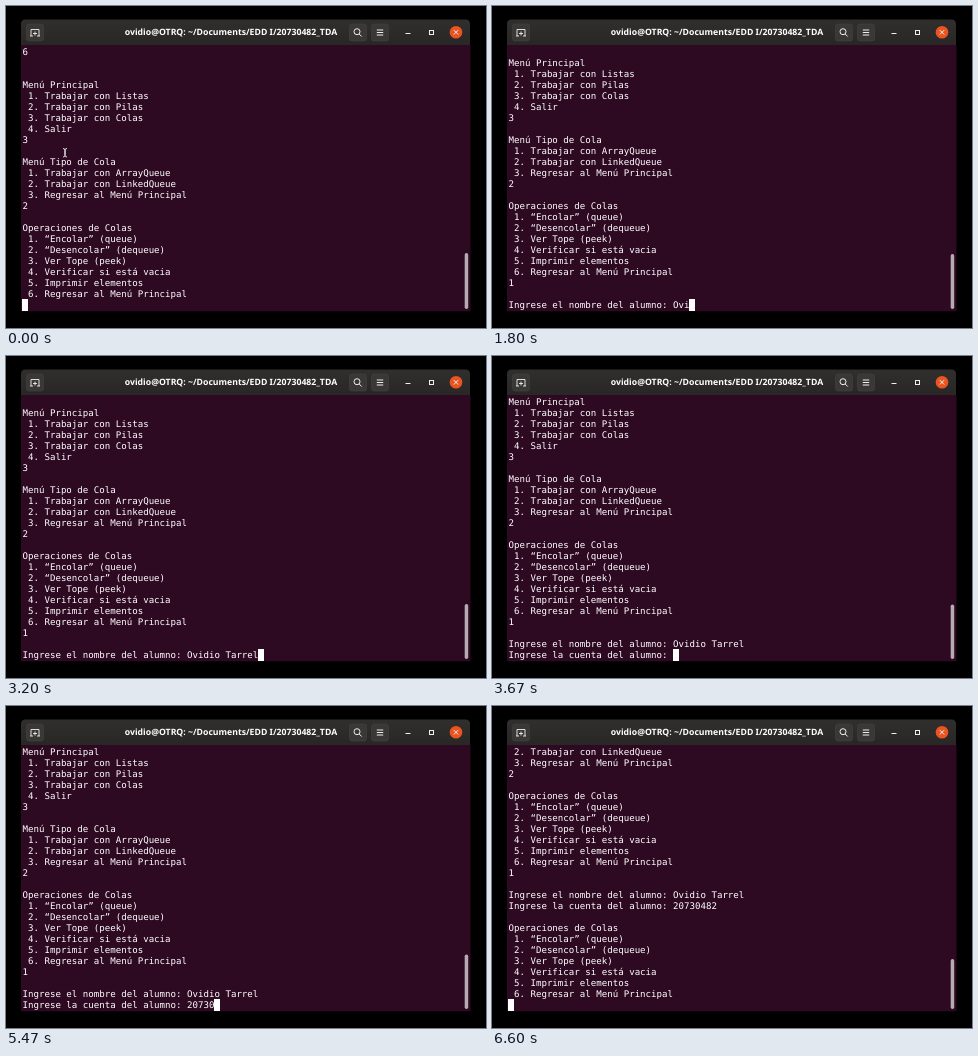
Write an HTML page that moves like this. It is 480x322 px and loops after 6990 ms.

```html
<!DOCTYPE html>
<html lang="es">
<head>
<meta charset="utf-8">
<title>Terminal</title>
<style>
  html, body { margin: 0; width: 100%; height: 100%; overflow: hidden; background: #000; }
  #stage { position: absolute; left: 0; top: 0; width: 480px; height: 322px; overflow: hidden; background: #000; }
  svg { position: absolute; left: 0; top: 0; }
  .title {
    font: bold 8.7px "Noto Sans", "Open Sans", sans-serif;
    fill: #fff; text-anchor: middle; text-rendering: geometricPrecision;
  }
  .button { fill: #3a3836; stroke: #454240; stroke-width: .6; }
  .icon { fill: none; stroke: #efefee; stroke-width: 1; }
  #screen {
    position: absolute; left: 16.5px; top: 42px; width: 440px; height: 264px; margin: 0;
    font: 9.12px/11px "DejaVu Sans Mono", monospace;
    color: #fff; white-space: pre; text-rendering: geometricPrecision;
  }
  #cursor {
    display: inline-block; position: relative; left: -.5px; top: -2px;
    width: 6px; height: 12px; margin-bottom: -1px; vertical-align: top; background: #fff;
  }
</style>
</head>
<body>
<div id="stage">
  <svg width="480" height="322" viewBox="0 0 480 322">
    <defs>
      <linearGradient id="bar" x2="0" y2="1">
        <stop offset="0" stop-color="#302f2d"/>
        <stop offset="1" stop-color="#282725"/>
      </linearGradient>
    </defs>
    <path d="M15 39.500V18q0-4.500 4.500-4.500h440q4.500 0 4.500 4.500v21.500z" fill="url(#bar)"/>
    <rect x="15" y="39" width="449.500" height="266.300" fill="#2d0922"/>

    <g class="button">
      <rect x="20.500" y="18" width="17" height="17" rx="2.500"/>
      <rect x="343.500" y="18" width="17" height="17" rx="2.500"/>
      <rect x="365.500" y="18" width="17" height="17" rx="2.500"/>
    </g>
    <g class="icon">
      <path d="M25 30v-6.500h8v6.500M24 30h3M31 30h3M29 25.500v4M27 27.500h4" stroke-width=".9"/>
      <circle cx="351" cy="25.700" r="3"/>
      <path d="M353.200 28l2.500 2.500"/>
      <path d="M370.800 24h6.400M370.800 26.500h6.400M370.800 29h6.400"/>
      <path d="M399.500 27.500h5"/>
      <rect x="423.500" y="24.500" width="4" height="4"/>
    </g>
    <circle cx="450" cy="26.300" r="6.300" fill="#e95420"/>
    <path class="icon" d="M447.800 24.100l4.400 4.400M452.200 24.100l-4.400 4.400"/>
    <text class="title" x="225" y="29">ovidio@OTRQ: ~/Documents/EDD I/20730482_TDA</text>

    <rect id="thumb" x="458.700" y="247" width="3.500" height="56" rx="1.700" fill="#b6abb2"/>
  </svg>
  <pre id="screen"><span id="text"></span><span id="cursor"></span></pre>
  <svg id="pointer" width="480" height="322" viewBox="0 0 480 322">
    <path d="M57 142.500q2 0 2 1.500v5.500q0 1.500-2 1.500M61 142.500q-2 0-2 1.500v5.500q0 1.500 2 1.500"
          fill="none" stroke="#e4dfe2" stroke-width="1"/>
  </svg>
</div>
<script>
  const LOOP = 6990, ROWS = 24;
  const $ = id => document.getElementById(id);
  const text = $("text"), thumb = $("thumb"), pointer = $("pointer");

  const menu = (title, ...items) =>
    [title, ...items.map((item, i) => ` ${i + 1}. ${item}`)].join("\n") + "\n";

  const queueMenu = menu("Operaciones de Colas",
    "“Encolar” (queue)", "“Desencolar” (dequeue)", "Ver Tope (peek)",
    "Verificar si está vacia", "Imprimir elementos", "Regresar al Menú Principal");

  const start = "6\n\n\n" +
    menu("Menú Principal", "Trabajar con Listas", "Trabajar con Pilas", "Trabajar con Colas", "Salir") +
    "3\n\n" +
    menu("Menú Tipo de Cola", "Trabajar con ArrayQueue", "Trabajar con LinkedQueue", "Regresar al Menú Principal") +
    "2\n\n" + queueMenu;

  const type = (word, times) => times.map((time, i) => [time, word[i]]);

  const events = [
    [0, start],
    [70, "1"],
    [200, "\n\nIngrese el nombre del alumno: "],
    ...type("Ovidio Tarrel",
      [1070, 1530, 1800, 1930, 2070, 2200, 2400, 2670, 2730, 2870, 3070, 3130, 3200]),
    [3670, "\nIngrese la cuenta del alumno: "],
    ...type("20730482", [4070, 4200, 4330, 4530, 5470, 5670, 6070, 6200]),
    [6530, "\n\n" + queueMenu]
  ];

  let shown = -1;
  function draw(now) {
    const t = now % LOOP;
    const past = events.filter(([time]) => time <= t);
    if (past.length !== shown) {
      shown = past.length;
      const lines = past.map(e => e[1]).join("").split("\n");
      const scrolled = lines.length - ROWS;
      const top = 247 + scrolled / 2;
      text.textContent = lines.slice(-ROWS).join("\n");
      thumb.setAttribute("y", top);
      thumb.setAttribute("height", 303 - top);
      pointer.style.display = shown > 1 ? "none" : "";
    }
  }

  const begin = performance.now();
  function tick() {
    draw(performance.now() - begin);
    requestAnimationFrame(tick);
  }
  tick();
</script>
</body>
</html>
```
